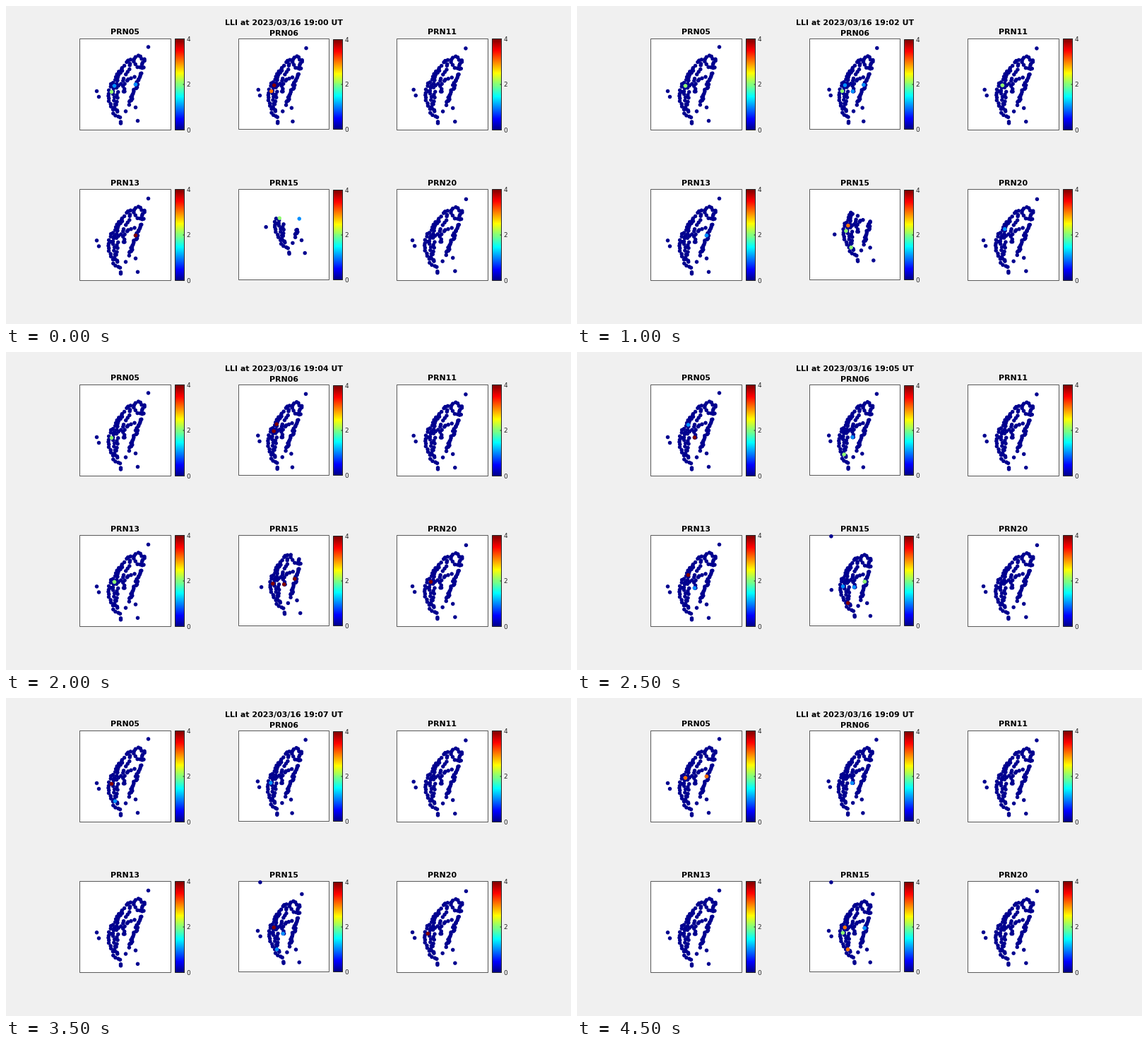
These frames come from a looping animation (800x450 px, 5000 ms). A matplotlib script:

```python
import numpy as np
import matplotlib.pyplot as plt
from matplotlib.animation import FuncAnimation
from matplotlib.patches import Rectangle

W, H, DPI = 800, 450, 100
FRAMES, INTERVAL = 10, 500
PX = 72 / DPI  # points per pixel
DARK = "#262626"
CENTRE = np.array([160, 110])  # middle of the island in the first panel
RISEN = 6  # minute from which PRN15 is seen by every station

# name: shift from the panel's grid place, tilt of x by (x, y), tilt of y by (x, y),
# chance of a non-zero report
SATELLITES = {
    "PRN05": ((0, 0), (0, 0), (0, 0), 0.45),
    "PRN06": ((1, -0.4), (-0.12, -0.056), (0.05, 0), 0.5),
    "PRN11": ((0, -0.3), (0.01, 0), (0.055, 0), 0.05),
    "PRN13": ((0, -0.3), (0, 0), (0.043, 0), 0.05),
    "PRN15": ((0.6, -0.5), (-0.06, 0.1), (0.09, -0.063), 0.7),
    "PRN20": ((-0.7, -0.4), (0.04, 0), (0.042, -0.02), 0.15),
}

# Stations that lose lock most often, most frequent first.
NOISY = np.array([(149, 121), (153, 112.5), (157, 102.5), (183, 110.5),
                  (166, 120.5), (154, 145.5)])

plt.rcParams["font.family"] = "DejaVu Sans"


def jet(value, top=4, levels=64):
    """64-level jet colour for a value between 0 and top."""
    v = (np.minimum(np.floor(np.asarray(value) / top * levels), levels - 1) + 1) / levels
    return np.stack([np.clip(1.5 - abs(4 * v - k), 0, 1) for k in (3, 2, 1)], axis=-1)


def strand(rng, count, jitter, *nodes):
    """Evenly spaced, slightly scattered points along a polyline."""
    x, y = np.array(nodes, float).T
    length = np.r_[0, np.cumsum(np.hypot(np.diff(x), np.diff(y)))]
    s = np.linspace(0, length[-1], count)
    line = np.c_[np.interp(s, length, x), np.interp(s, length, y)]
    return line + rng.uniform(-jitter, jitter, line.shape)


def build_stations():
    rng = np.random.default_rng(7)
    remote = [(128, 120), (131, 128), (201, 57.5), (186, 162), (183, 143),
              (169, 148.5), (162, 165.5), (162, 163.5)]
    west = strand(rng, 24, 1.2, (172, 76), (167, 84), (158, 95), (149, 110),
                  (144, 126), (148, 142), (153, 153), (162, 157))
    plain = strand(rng, 16, 1.5, (164, 90), (157, 104), (151, 118), (152, 136), (157, 150))
    hills = strand(rng, 15, 1.5, (176, 80), (172, 92), (165, 106), (157, 117), (156, 139))
    ridge = strand(rng, 8, 1, (181, 99), (173, 103), (166, 111), (167, 121))
    north = strand(rng, 17, 1, (173, 77), (181, 74), (187, 69), (192, 74), (197, 75),
                   (192, 80), (195, 87), (185, 85), (181, 79))
    east = strand(rng, 24, 1.5, (191, 94), (187, 104), (183, 116), (179, 127), (173, 138))
    return np.vstack([remote, west, plain, hills, ridge, north, east, NOISY])


STATIONS = build_stations()


def grid(name):
    """Column and row of a panel."""
    row, col = divmod(list(SATELLITES).index(name), 3)
    return col, row


def project(points, name, frame):
    """Where the lines of sight from the stations fall in a panel."""
    shift, tilt_x, tilt_y, _ = SATELLITES[name]
    moved = points + (points - CENTRE) @ np.array([tilt_x, tilt_y]).T
    moved = moved + shift + np.multiply(grid(name), (224.5, 213))
    if name == "PRN06":
        moved -= np.array([1.1, 0.6]) * frame / (FRAMES - 1)
    if name == "PRN15":
        moved += np.array([8, -24.5]) * max(0, 1 - frame / 5.2) ** 1.15
    return moved


def in_view(points, name, frame):
    """While PRN15 rises, a slanted edge hides the stations north of it."""
    if name != "PRN15" or frame >= RISEN:
        return points
    keep = points[:, 1] - 0.5 * (points[:, 0] - 390) > 304 - 6 * frame
    keep[0] = False
    return points[keep]


def reports(name, frame):
    """Noisy stations with a non-zero value in this minute."""
    rng = np.random.default_rng([int(name[3:]), frame])
    count = rng.binomial(4, SATELLITES[name][3])
    weight = 0.7 ** np.arange(len(NOISY))
    picks = rng.choice(len(NOISY), count, replace=False, p=weight / weight.sum())
    values = rng.choice([1, 2, 3, 4], count, p=[0.4, 0.2, 0.1, 0.3])
    return NOISY[picks], values


def panel_points(name, frame):
    """Positions and values of every dot in one panel."""
    quiet = in_view(project(STATIONS, name, frame), name, frame)
    if name == "PRN15" and frame >= RISEN - 1:
        quiet = np.vstack([quiet, (359.4, 260.3)])
    sites, values = reports(name, frame)
    places = np.vstack([quiet, project(sites, name, frame)])
    return places, np.r_[np.zeros(len(quiet)), values]


fig = plt.figure(figsize=(W / DPI, H / DPI), dpi=DPI, facecolor="#f0f0f0")
ax = fig.add_axes([0, 0, 1, 1])
ax.axis("off")


def box(x0, y0, x1, y1, **style):
    ax.add_patch(Rectangle((x0, y0), x1 - x0, y1 - y0, lw=PX, snap=False, **style))


def label(x, y, text, size, **style):
    return ax.text(x, y, text, fontsize=size * PX, va="baseline", **style)


def draw_panel(name):
    col, row = grid(name)
    middle = col == 1
    x0, y0 = (104, 329, 553)[col], 46 + 213 * row
    x1, y1 = x0 + 129 - middle, y0 + 129 - middle
    box(x0, y0, x1, y1, fc="white", ec="#5a5a5a", zorder=1)
    label((x0 + x1) / 2 - 0.5, y0 - 6 + middle, name, 11, weight="bold", ha="center")

    bx0, by0 = x1 + 6, y0 + middle
    bx1 = bx0 + 13
    ramp = jet(np.linspace(4, 0, 64))[:, None, :]
    ax.imshow(ramp, extent=(bx0, bx1, y1, by0), aspect="auto",
              interpolation="nearest", zorder=1)
    box(bx0, by0, bx1, y1, fc="none", ec=DARK, zorder=2)
    for v in (0, 2, 4):
        y = y1 + (by0 - y1) * v / 4
        ax.plot([bx1 - 1.5, bx1], [y, y], color=DARK, lw=PX, snap=False, zorder=2)
        label(bx1 + 3, y + 3.4, str(v), 9, color=DARK, ha="left")
    return ax.scatter([], [], s=(5.5 * PX) ** 2, linewidths=0, zorder=3)


dots = {name: draw_panel(name) for name in SATELLITES}
title = label(393, 27, "", 11, weight="bold", ha="center")
# Whole numbers fall on pixel centres.
ax.set_xlim(-0.5, W - 0.5)
ax.set_ylim(H - 0.5, -0.5)


def update(frame):
    title.set_text(f"LLI at 2023/03/16 19:{frame:02d} UT")
    for name, cloud in dots.items():
        places, values = panel_points(name, frame)
        cloud.set_offsets(places)
        cloud.set_facecolors(jet(values))
    return [title, *dots.values()]


anim = FuncAnimation(fig, update, frames=FRAMES, interval=INTERVAL,
                     repeat=True, repeat_delay=0, blit=False)
plt.show()
```
